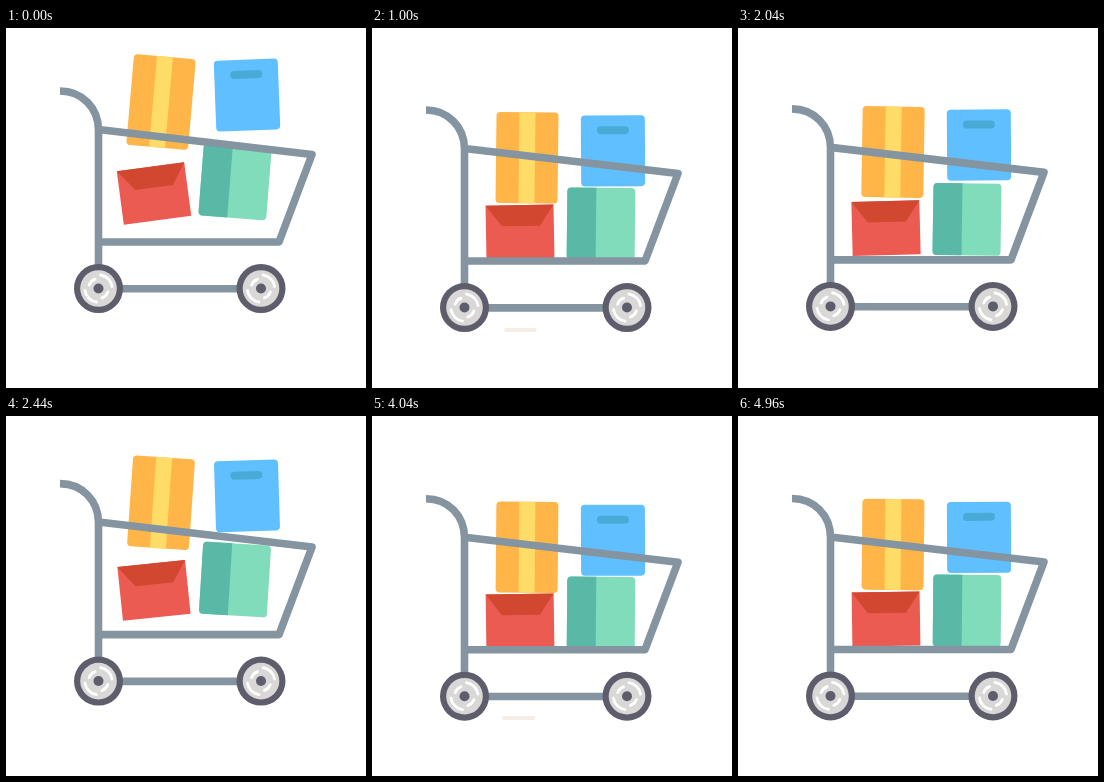
Write an HTML page that moves like this. It is 360 px wide and 360 px high and loops after 5000 ms.

```html
<!DOCTYPE html>
<html lang="en">
<head>
<meta charset="utf-8">
<title>Shopping cart</title>
<style>
html, body { margin: 0; width: 100%; height: 100%; overflow: hidden; background: #fff; }
svg { display: block; width: 100vw; height: 100vh; }
.frame { fill: none; stroke: #8494a0; stroke-width: 7.6; stroke-linejoin: round; }
.shine { fill: none; stroke: #fff; stroke-width: 2.8; stroke-linecap: round; }
</style>
</head>
<body>
<svg viewBox="0 0 360 360">
  <defs>
    <g id="wheel">
      <circle r="24.5" fill="#5d5d6b"/>
      <circle r="18.3" fill="#d9d8d7"/>
      <path class="shine" d="M2-13.5A13.6 13.6 0 0 1 13.5-2M-2 13.5A13.6 13.6 0 0 1-13.5 2M-9.4-3.4A10 10 0 0 1-3.4-9.4M9.4 3.4A10 10 0 0 1 3.4 9.4"/>
      <circle r="5" fill="#5d5d6b"/>
    </g>
  </defs>
  <rect id="ground" y="300" height="4" rx="2" fill="#f6ede8"/>
  <g id="red">
    <path d="M-34-27H34V27H-34Z" fill="#ec5b52"/>
    <path d="M-34-27H34L20-6H-18Z" fill="#d2472f"/>
  </g>
  <g id="green">
    <rect x="-34" y="-36" width="68" height="72" rx="4" fill="#80dcba"/>
    <path d="M-5-36H-30A4 4 0 0 0-34-32V32A4 4 0 0 0-30 36H-5Z" fill="#5ab8a6"/>
  </g>
  <g id="yellow">
    <rect x="-31" y="-45.5" width="62" height="91" rx="4" fill="#ffb547"/>
    <path d="M-8-45.5H8V45.5H-8Z" fill="#ffdb68"/>
  </g>
  <g id="blue">
    <rect x="-32" y="-35.5" width="64" height="71" rx="4" fill="#5fbfff"/>
    <rect x="-16" y="-24.5" width="32" height="8" rx="4" fill="#4aaad6"/>
  </g>
  <g id="cart">
    <path class="frame" d="M54 63C76 63 92.5 80 92.5 102V240M92.5 101.5L306 126.5L273 214H92.5M110 260.8H240"/>
    <use href="#wheel" x="92.5" y="260.5"/>
    <use href="#wheel" x="255" y="260.5"/>
  </g>
</svg>
<script>
const LOOP = 5000, HALF = 1500;
const el = id => document.getElementById(id);
const cart = el('cart'), ground = el('ground');

// x, raised y, lowered y, raised tilt in degrees
const boxes = [
  ['red', 148, 165.5, 208, -7.5],
  ['green', 229, 154, 200, 4.5],
  ['yellow', 155, 74, 135.5, 5],
  ['blue', 241, 67, 128.5, -2.2]
].map(([id, ...pose]) => [el(id), ...pose]);

const clamp = x => Math.min(1, Math.max(0, x));
const ease = x => {
  x = clamp(x);
  return x < 0.5 ? 4 * x ** 3 : 1 - 4 * (1 - x) ** 3;
};

// 0 is raised, 1 is lowered; lead starts the descent early
function drop(p, lead) {
  return p < HALF ? ease((p + lead) / HALF) : 1 - ease((p - HALF) / HALF);
}

function draw(t) {
  const p = t % (2 * HALF);
  const down = drop(p, 15), fall = drop(p, 72);
  cart.setAttribute('transform', `translate(0 ${22 * down})`);
  for (const [node, x, top, low, tilt] of boxes) {
    const y = top + (low - top) * fall;
    node.setAttribute('transform', `translate(${x} ${y}) rotate(${tilt * (1 - down)})`);
  }
  const slide = (p - 640) / 400;
  ground.setAttribute('x', 152 - 22 * slide);
  ground.setAttribute('width', Math.max(0, 29 + 4 * slide));
  ground.setAttribute('opacity', clamp((p - 480) / 120) * clamp((1200 - p) / 120));
}

let start;
function tick(now) {
  start ??= now;
  draw((now - start) % LOOP);
  requestAnimationFrame(tick);
}
draw(0);
requestAnimationFrame(tick);
</script>
</body>
</html>
```
